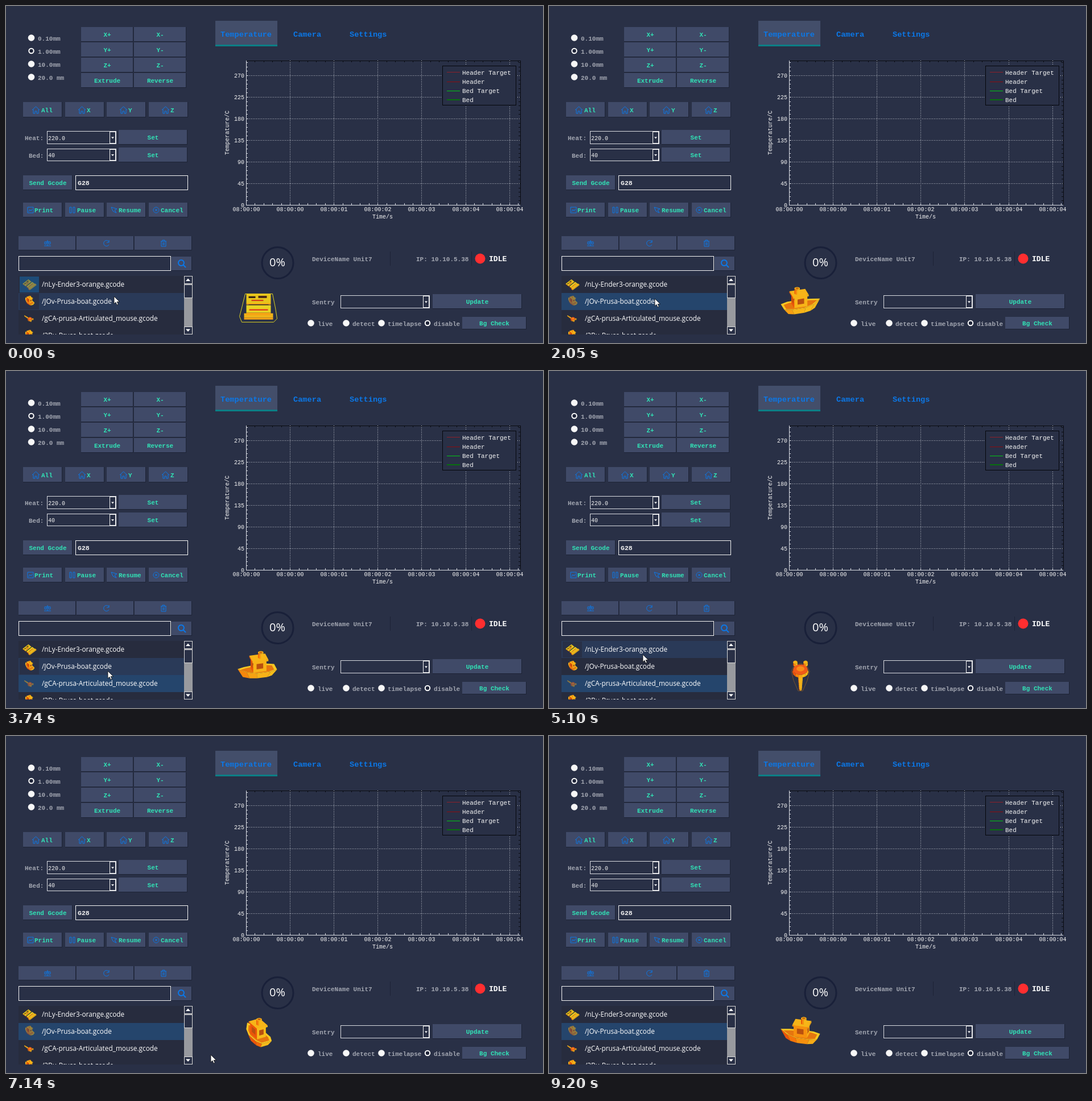
An HTML page that plays this animation: 944x593 px, repeating every 9300 ms.

```html
<!DOCTYPE html>
<html lang="en">
<head>
<meta charset="utf-8">
<title>Printer control panel</title>
<style>
  html, body { margin: 0; width: 100%; height: 100%; overflow: hidden; background: #293046; }
  svg { display: block; width: 944px; height: 593px; }
  text { font-family: "Liberation Mono", monospace; white-space: pre; }
  .list text, .percent { font-family: "Open Sans", "Noto Sans", sans-serif; }
  rect, .crisp { shape-rendering: crispEdges; }
</style>
</head>
<body>
<svg viewBox="0 0 944 593">
  <defs><clipPath id="listClip"><rect x="22" y="475" width="291" height="103"/></clipPath></defs>
  <g id="panel"></g>
  <g id="list" class="list" clip-path="url(#listClip)"></g>
  <g id="preview"></g>
  <path id="cursor" d="M0 0V13L3 10.3L5 15L7.2 14L5.2 9.5H9.5Z" fill="#fff" stroke="#111" stroke-width=".8"/>
</svg>
<script>
const BG = '#293046', BUTTON = '#404a68', MINT = '#31e3b6', BLUE = '#0b78e8', GREY = '#a2a6b1', WHITE = '#f4f4f4';
const byId = id => document.getElementById(id);

// ---- Drawing helpers ----
const rect = (x, y, w, h, fill, stroke) => stroke
  ? `<rect x="${x + .5}" y="${y + .5}" width="${w - 1}" height="${h - 1}" fill="${fill}" stroke="${stroke}"/>`
  : `<rect x="${x}" y="${y}" width="${w}" height="${h}" fill="${fill}"/>`;
const text = (x, y, str, fill = GREY, size = 11, more = 'font-weight="bold"') =>
  `<text x="${x}" y="${y}" fill="${fill}" font-size="${size}" ${more}>${str}</text>`;
const plain = (x, y, str, size = 10, anchor = 'start') =>
  text(x, y, str, WHITE, size, `text-anchor="${anchor}"`);
const path = (d, stroke, width = 1, more = '') =>
  `<path d="${d}" fill="none" stroke="${stroke}" stroke-width="${width}" ${more}/>`;
const icon = (x, y, d) => path(d, BLUE, 1, `transform="translate(${x} ${y})"`);
const circle = (x, y, r, fill, more = '') => `<circle cx="${x}" cy="${y}" r="${r}" fill="${fill}" ${more}/>`;

function button(x, y, w, h, label = '', labelX) {
  const anchor = labelX ? 'start' : 'middle';
  return rect(x, y, w, h, '#1d2335') + rect(x, y, w - 1, h - 1, BUTTON)
    + text(labelX || x + w / 2, y + h / 2 + 4, label, MINT, 11, `font-weight="bold" text-anchor="${anchor}"`);
}
function combo(x, y, w, h, value = '') {
  const ax = x + w - 12;
  return rect(x, y, w, h, BG, '#d8dae0') + rect(ax, y + 1, 11, h - 2, BG, WHITE)
    + `<path d="M${ax + 3} ${y + h / 2 - 1}h5l-2.5 3z" fill="#fff"/>` + plain(x + 2, y + h / 2 + 4, value);
}
const radio = (x, y, label, labelX, on) =>
  (on ? circle(x, y, 4.2, '#20263a', 'stroke="#fff" stroke-width="2"') : circle(x, y, 5.8, '#f7f7f7'))
  + text(labelX, y + 4.5, label);

// ---- Static panel ----
function controls() {
  let out = '';
  ['0.10mm', '1.00mm', '10.0mm', '20.0 mm'].forEach((s, i) => out += radio(44.5, 56 + 23 * i, s, 56, i === 1));
  [['X+', 'X-'], ['Y+', 'Y-'], ['Z+', 'Z-'], ['Extrude', 'Reverse']].forEach((pair, r) =>
    pair.forEach((s, c) => out += button(132 + 93 * c, 37 + 27.2 * r | 0, 92, 26, s)));
  const home = 'M0 6L6.5 0L13 6M2 5V12H5V8H8V12H11V5';
  ['All', 'X', 'Y', 'Z'].forEach((s, i) => {
    const x = 30 + Math.round(73.5 * i);
    out += button(x, 169, 69, 27, s, x + (i ? 38 : 32)) + icon(x + (i ? 23 : 16), 177, home);
  });
  out += text(33, 236, 'Heat:') + combo(72, 220, 122, 23, '220.0') + button(198, 218, 121, 26, 'Set')
    + text(40, 267, 'Bed:') + combo(72, 251, 122, 22, '40') + button(198, 249, 121, 26, 'Set')
    + button(30, 298, 87, 26, 'Send Gcode') + rect(122, 298, 198, 26, BG, WHITE)
    + text(126, 315, 'G28', WHITE, 11.5);
  const actions = [
    ['Print', 20, 'M0 0H10V10H0ZM2 8L4 4L6 7L8 3'], ['Pause', 21, 'M0 0H3V10H0ZM6 0H9V10H6Z'],
    ['Resume', 21, 'M0 0L10 3L6 5L9 10L3 7Z'], ['Cancel', 21, 'M5 0A5 5 0 1 1 4.9 0M3 3L7 7M7 3L3 7']];
  actions.forEach(([s, dx, d], i) => {
    const x = 30 + Math.round(73.5 * i);
    out += button(x, 346, 69, 26, s, x + dx) + icon(x + 8, 354, d);
  });
  const tools = ['M6 0V10M0 10H12M1 3H11M1 3V7H4V3M8 3V7H11V3',
    'M11 3A5 5 0 1 0 11 8M11 0V4H7', 'M0 2H10M3 2V0H7V2M1 2V11H9V2M4 4V9M6 4V9'];
  tools.forEach((d, i) => out += button(22 + 102 * i, 405, 101, 25) + icon(67 + 102 * i + (i === 2 ? 1 : i), 412, d));
  return out + rect(22, 440, 268, 26, BG, WHITE) + button(291, 441, 36, 25)
    + path('M312 456L316 460M308 447A5 5 0 1 1 307.9 447', BLUE, 2);
}

function scrollbar() {
  const arrow = (y, d) => rect(313, y, 15, 14, BG, '#d8d8d8') + `<path d="${d}" fill="#fff"/>`;
  return rect(313, 475, 15, 103, '#989a9f') + arrow(475, 'M316 484h8l-4 -4.5z')
    + arrow(564, 'M316 568.5h8l-4 4.5z') + rect(313, 490, 15, 24, BG, '#d8d8d8');
}

function chart() {
  let grid = '', darkTicks = '', lightTicks = '', labels = '';
  for (let i = 0; i < 7; i++) {
    const x = Math.round(422 + 77.1 * i) + .5, y = Math.round(350 - 38 * i) + .5;
    if (i) grid += `M${x} 96V350M422 ${y}H904`;
    labels += plain(x, 361, '08:00:0' + [0, 0, 1, 2, 3, 4, 4][i], 10, 'middle')
      + plain(419, y + 3.5, 45 * i, 10, 'end');
  }
  for (let x = 422.5; x < 904; x += 15.42) { darkTicks += `M${x} 96v3`; lightTicks += `M${x} 350v-3`; }
  for (let y = 350.5; y > 96; y -= 7.6) { darkTicks += `M904 ${y}h-3`; lightTicks += `M422 ${y}h3`; }
  let out = path('M422 96.5H904.5V350' + darkTicks, '#0a0c12', 1, 'class="crisp"')
    + path('M422.5 96V350.5H904' + lightTicks, '#d9dce3', 1, 'class="crisp"')
    + path(grid, '#c5c9d2', 1, 'stroke-dasharray="1 2" class="crisp"') + labels
    + plain(662, 374, 'Time/s', 10, 'middle')
    + `<g transform="translate(392 223) rotate(-90)">${plain(0, 0, 'Temperature/C', 10, 'middle')}</g>`
    + rect(767, 105, 130, 70, BG, '#05070c');
  [['Header Target', '#8e2029'], ['Header', '#8c0b10'], ['Bed Target', '#00c814'], ['Bed', '#08700e']].forEach(([s, color], i) =>
    out += rect(775, (i === 0 ? 116 : 117) + 16 * i - (i === 3), 23, i === 3 ? 2 : 1, color)
      + plain(802, 121 + 16 * i, s, 11));
  return out;
}

function status() {
  let out = rect(368, 26, 109, 43, '#434e6a') + rect(368, 68, 109, 3, '#0c7f86');
  [['Temperature', 377], ['Camera', 505], ['Settings', 604]].forEach(([s, x]) => out += text(x, 54, s, BLUE, 13.65));
  out += circle(477.5, 452, 27.5, 'none', 'stroke="#192039" stroke-width="3"')
    + text(477, 458, '0%', '#fff', 20, 'class="percent" text-anchor="middle"')
    + text(538, 449, 'DeviceName Unit7') + rect(675, 432, 1, 25, '#1d2337')
    + text(721, 449, 'IP: 10.10.5.38') + rect(818, 432, 1, 25, '#1d2337')
    + circle(833.5, 444.5, 9, '#ff2e30') + text(849, 449, 'IDLE', '#fff', 13.1)
    + text(538, 525, 'Sentry') + combo(588, 509, 157, 23) + button(750, 507, 157, 26, 'Update')
    + button(802, 547, 113, 22, 'Bg Check');
  [['live', 536, 548], ['detect', 598, 609], ['timelapse', 660, 671], ['disable', 741, 752]].forEach(([s, x, lx]) =>
    out += radio(x, 558, s, lx, s === 'disable'));
  return out;
}

// ---- Turntable models: stacked prisms over plan outlines, counter-clockwise ----
const box = (x0, x1, y0, y1) => [[x0, y0], [x1, y0], [x1, y1], [x0, y1]];
const oval = (cx, cy, rx, ry, n = 14) => Array.from({ length: n }, (_, i) => {
  const a = i / n * 2 * Math.PI;
  return [cx + rx * Math.cos(a), cy + ry * Math.sin(a)];
});
const hull = [[-33, -10], [-20, -15], [5, -15], [22, -10], [36, 0], [22, 10], [5, 15], [-20, 15], [-33, 10]];
const sheer = x => 12 + Math.max(0, x) ** 2 / 240;
const tail = Array.from({ length: 7 }, (_, i) => ({ plan: oval(0, -12 - 4 * i, 4 - i * .25, 2.4, 8), z0: 0, z1: 4 }));

const models = {
  boat: { cx: 442, cy: 535, tilt: 30, parts: [
    { plan: hull, z0: 0, z1: sheer, taper: .74, top: '#f8c822' },
    { plan: hull.map(([x, y]) => [x * .86, y * .78]), flat: '#e5760f', z1: x => sheer(x) - 1 },
    { plan: box(-14, 10, -9, 9), z0: 11, z1: 32, window: '#b9500f' },
    { plan: box(-17, 12, -11, 11), z0: 32, z1: 35 },
    { plan: oval(-6, 0, 5, 5, 10), z0: 35, z1: 45 },
    { plan: oval(-6, 0, 3, 3, 10), flat: '#c8660c', z1: 45 }] },
  plate: { cx: 443.5, cy: 531, tilt: 50, parts: [
    { plan: [[-29, -33], [27, -33], [33, -25], [30, 0], [25, 32], [-23, 32], [-29, 0], [-33, -20]], outline: '#d9cf25' },
    { plan: box(-21, 22, 7, 29), z0: 0, z1: 4, top: '#e8c51c' },
    { plan: box(-17, -5, 19, 23), flat: '#342114', z1: 4 },
    { plan: box(0, 15, 19, 24), flat: '#4b2815', z1: 4 },
    { plan: box(-12, 9, 12, 15), flat: '#d5421a', z1: 4 },
    { plan: box(-17, 18, 0, 6), z0: 0, z1: 2, top: '#2a2528' },
    { plan: box(-25, 26, -27, -17), z0: 0, z1: 5, top: '#f0b319' },
    { plan: box(-21, 22, -17, 0), z0: 0, z1: 7, top: '#e9d322' },
    { plan: box(-16, 17, -12, -9), flat: '#df3618', z1: 7 }] },
  mouse: { cx: 442, cy: 533, tilt: 50, parts: [
    { plan: [[-4, -39], [4, -39], [12, -15], [16, 6], [11, 20], [0, 24], [-11, 20], [-16, 6], [-12, -15]], outline: '#74502e' },
    ...tail,
    { plan: oval(-9, 19, 4, 4, 9), z0: 2, z1: 9 },
    { plan: oval(9, 19, 4, 4, 9), z0: 2, z1: 9 },
    { plan: oval(0, 4, 13, 12), z0: 0, z1: 7, taper: 1.1, top: '#f05a18' },
    { plan: oval(0, 5, 7, 6), flat: '#f88b19', z1: 8 }] }
};

const heat = b => `hsl(${20 + 26 * b} 93% ${48 + 6 * b}%)`;

function drawModel(name, yaw, cx, cy, scale = 1) {
  const { cx: mx, cy: my, tilt, parts } = models[name];
  const rad = Math.PI / 180, c = Math.cos(yaw * rad), s = Math.sin(yaw * rad);
  const lift = Math.cos(tilt * rad), depth = Math.sin(tilt * rad);
  const project = (x, y, z) => [(cx ?? mx) + scale * (x * c - y * s),
    (cy ?? my) - scale * ((x * s + y * c) * depth + z * lift)];
  const facing = p => p.reduce((sum, [x, y], i) => {
    const [u, v] = p[(i + 1) % p.length];
    return sum + x * v - u * y;
  }, 0) < 0;
  const poly = (p, fill, stroke = 'none') =>
    `<polygon points="${p.map(q => q.map(n => n.toFixed(1))).join(' ')}" fill="${fill}" stroke="${stroke}"/>`;

  return parts.map(({ plan, z0, z1 = 0, taper = 1, top, flat, outline, window: pane }) => {
    const height = x => typeof z1 === 'function' ? z1(x) : z1;
    const upper = plan.map(([x, y]) => project(x, y, height(x)));
    if (outline) return cx === undefined ? poly(upper, 'none', outline) : '';
    if (flat) return poly(upper, flat);
    const lower = plan.map(([x, y]) => project(x * taper, y * taper, z0));
    let out = '';
    plan.forEach(([x, y], i) => {
      const j = (i + 1) % plan.length, face = [lower[i], lower[j], upper[j], upper[i]];
      if (!facing(face)) return;
      const dx = plan[j][0] - x, dy = plan[j][1] - y, len = Math.hypot(dx, dy);
      const nx = (dy * c + dx * s) / len, ny = (dy * s - dx * c) / len;
      out += poly(face, heat(Math.max(0, .6 * nx - .7 * ny)));
      if (pane) {
        const at = (u, v) => [0, 1].map(k =>
          (face[0][k] * (1 - u) + face[1][k] * u) * (1 - v) + (face[3][k] * (1 - u) + face[2][k] * u) * v);
        out += poly([at(.25, .3), at(.75, .3), at(.75, .8), at(.25, .8)], pane);
      }
    });
    return out + poly(upper, top || heat(.85));
  }).join('');
}

// ---- File list ----
const files = [
  ['/nLy-Ender3-orange.gcode', 'plate', 45, .33],
  ['/JOv-Prusa-boat.gcode', 'boat', 125, .34],
  ['/gCA-prusa-Articulated_mouse.gcode', 'mouse', 230, .3],
  ['/2Bu-Prusa-boat.gcode', 'boat', 125, .34]];

function drawList(selected, hovered, focused) {
  return files.map(([name, model, yaw, scale], i) => {
    const y = 475 + 30 * i, chosen = i === selected, active = chosen && focused;
    const fill = active ? '#25456c' : i === hovered ? '#2a3a58' : '#272c3e';
    const cell = active ? 'none' : chosen ? '#1e4c78' : i === hovered ? '#283047' : 'none';
    return rect(22, y, 291, 30, fill) + rect(24, y + 1, 34, 28, cell)
      + `<g opacity="${chosen ? .55 : 1}">${drawModel(model, yaw, 41, y + (model === 'boat' ? 18 : 16), scale)}</g>`
      + text(63, y + 19, name, '#fff', 11.8, '');
  }).join('');
}

// ---- Timeline: [time, pointer x, pointer y, selected, hovered, model, yaw] ----
const LOOP = 9300;
const steps = [
  [0, 190, 511, 0, 1, 'plate', 0],
  [350, 188, 512, 0, 1, 'plate', -60],
  [690, 186, 513, 1, 1, 'plate', -120],
  [1030, 186, 513, 1, 1, 'boat', 200],
  [1370, 186, 513, 1, 1, 'boat', 139],
  [1710, 186, 513, 1, 1, 'boat', 78],
  [2050, 186, 515, 1, 1, 'boat', 17],
  [2390, 184, 526, 1, 1, 'boat', -44],
  [2730, 180, 548, 1, 2, 'boat', -105],
  [3070, 179, 553, 1, 2, 'boat', 195],
  [3410, 179, 552, 2, 2, 'boat', 195],
  [3740, 179, 528, 2, 1, 'boat', 195],
  [4080, 175, 516, 2, 1, 'mouse', 180],
  [4420, 168, 503, 2, 0, 'mouse', 120],
  [4760, 165, 499, 2, 0, 'mouse', 60],
  [5100, 165, 499, 2, 0, 'mouse', 0],
  [5450, 166, 501, 2, 0, 'mouse', -60],
  [5790, 172, 514, 2, 1, 'mouse', -120],
  [6130, 175, 519, 2, 1, 'mouse', 180],
  [6460, 176, 519, 1, 1, 'mouse', 180],
  [6800, 260, 540, 1, -1, 'boat', 180],
  [7140, 360, 561, 1, -1, 'boat', 120],
  [7490, 520, 530, 1, -1, 'boat', 60],
  [7830, 692, 510, 1, -1, 'boat', 0],
  [8170, -50, 0, 1, -1, 'boat', -60],
  [8510, -50, 0, 1, -1, 'boat', -120],
  [9200, -50, 0, 1, -1, 'boat', 165]
];

byId('panel').innerHTML = controls() + scrollbar() + chart() + status();

let shown;
function frame() {
  const t = performance.now() % LOOP;
  const step = steps.findLast(([start]) => start <= t);
  if (step !== shown) {
    shown = step;
    const [start, x, y, selected, hovered, model, yaw] = step;
    byId('list').innerHTML = drawList(selected, hovered, selected > 0);
    byId('preview').innerHTML = drawModel(model, yaw);
    byId('cursor').setAttribute('transform', `translate(${x} ${y})`);
  }
  requestAnimationFrame(frame);
}
frame();
</script>
</body>
</html>
```
